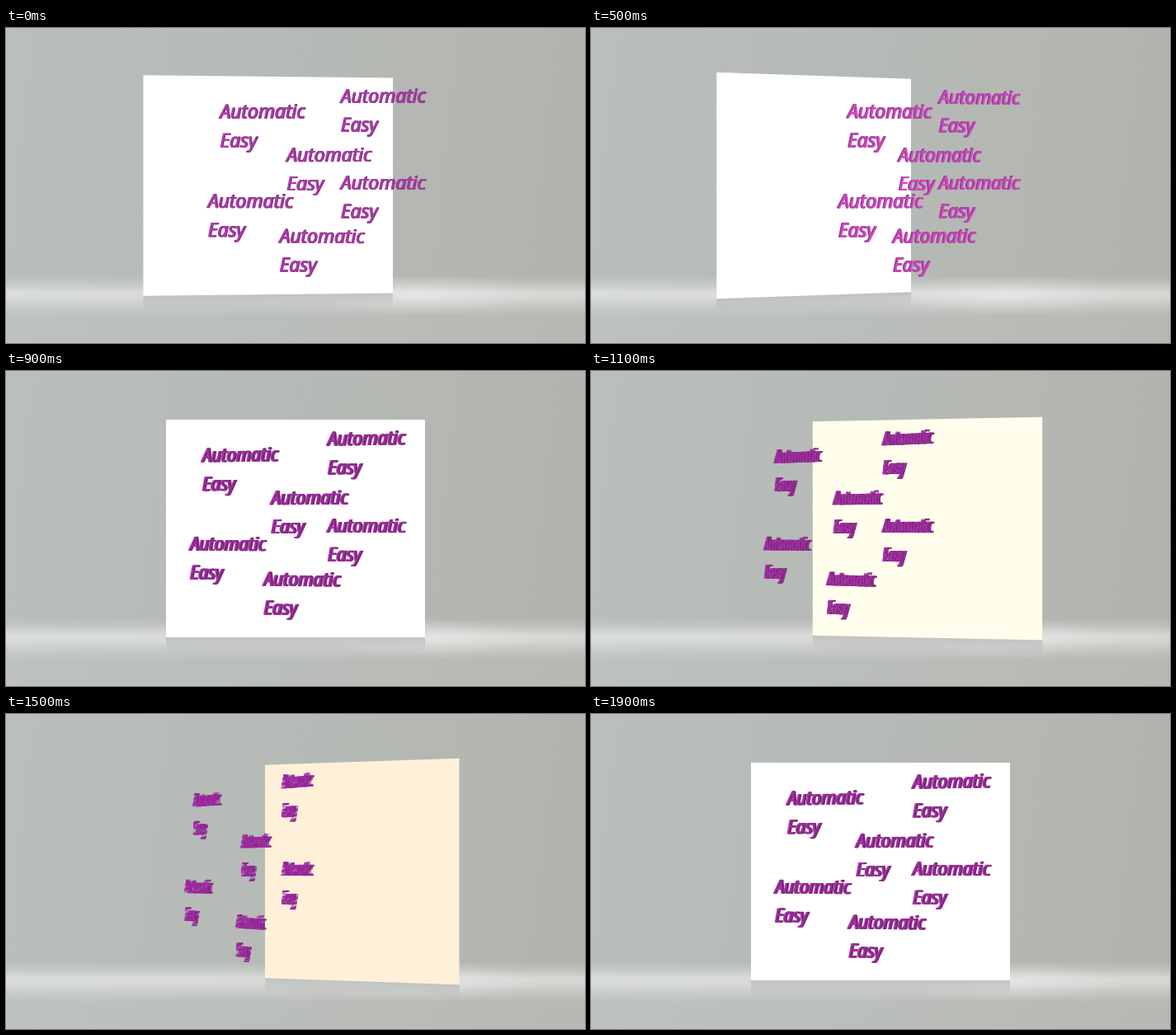
These frames come from a looping animation (702x382 px, 2000 ms). An HTML page:

```html
<!DOCTYPE html>
<html lang="en">
<head>
<meta charset="utf-8">
<title>Swinging card</title>
<style>
  html, body { margin: 0; width: 100%; height: 100%; overflow: hidden; }

  #stage {
    position: relative;
    width: 702px;
    height: 382px;
    overflow: hidden;
    perspective: 3600px;
    background:
      radial-gradient(ellipse 150px 24px at 500px 324px, #fff5, #fff0),
      linear-gradient(#fff0 300px, #fff3 311px, #fff7 320px, #fff7 326px, #fff4 336px, #fff1 350px, #fff1 382px),
      linear-gradient(97deg, #b9bfbb, #b6bab6 45%, #b1b3ad);
  }

  .swing {
    position: absolute;
    inset: 0;
    transform-style: preserve-3d;
    transform: translateZ(calc(-1 * var(--depth))) rotateY(var(--turn));
  }

  #back { --depth: -112px; }
  #front { --depth: 88px; }

  #card {
    position: absolute;
    left: 194px;
    top: 59px;
    width: 314px;
    height: 264px;
    background: var(--card);
    transform: translateZ(var(--depth));
  }

  #card::after {
    content: "";
    position: absolute;
    top: 100%;
    width: 100%;
    height: 19px;
    background: linear-gradient(#b9bbb8cc, #b9bbb800);
  }

  .words {
    position: absolute;
    display: grid;
    transform-style: preserve-3d;
    transform: translate(-50%) translateZ(var(--depth)) rotateY(-28deg);
    font: italic 400 23.5px/35px "Open Sans", "Noto Sans", sans-serif;
    white-space: pre;
  }

  .layer {
    grid-area: 1 / 1;
    color: var(--side);
    transform: translateZ(var(--z));
  }

  .layer:last-child { color: var(--face); }
</style>
</head>
<body>
<div id="stage">
  <div id="back" class="swing"><div id="card"></div></div>
  <div id="front" class="swing"></div>
</div>
<script>
  const STEP_MS = 100, STEPS = 20, MAX_TURN = 45, THICKNESS = 6;

  // Centre of each word pair's first line, facing the viewer
  const places = [[284, 104], [437, 84], [368, 156], [269, 212], [437, 190], [359, 255]];

  // Colours under the fixed light, by turn in degrees
  const shades = [
    { turn: -45, face: '#b02fb4', side: '#8b2390', card: '#ffeed7' },
    { turn: -29, face: '#ad30ae', side: '#842585', card: '#fffdec' },
    { turn: 0, face: '#ab2eab', side: '#792778', card: '#ffffff' },
    { turn: 16, face: '#b13cac', side: '#823083', card: '#ffffff' },
    { turn: 29, face: '#b83cb4', side: '#8f3592', card: '#ffffff' },
    { turn: 45, face: '#e04cc4', side: '#943a98', card: '#ffffff' }
  ];

  const stage = document.getElementById('stage');
  const front = document.getElementById('front');

  function addWords([x, y]) {
    const words = document.createElement('div');
    words.className = 'words';
    words.style.left = x + 'px';
    words.style.top = y - 19.6 + 'px';
    for (let i = 0; i <= THICKNESS; i++) {
      const layer = document.createElement('div');
      layer.className = 'layer';
      layer.textContent = 'Automatic\nEasy';
      layer.style.setProperty('--z', i - THICKNESS / 2 + 'px');
      if (i < THICKNESS) layer.setAttribute('aria-hidden', 'true');
      words.append(layer);
    }
    front.append(words);
  }

  const channels = hex => [1, 3, 5].map(i => parseInt(hex.slice(i, i + 2), 16));

  function mix(from, to, amount) {
    const end = channels(to);
    return `rgb(${channels(from).map((v, i) => Math.round(v + (end[i] - v) * amount))})`;
  }

  // Decelerates to each side and accelerates back through the middle
  function turnAt(step) {
    const phase = (step + 1) % STEPS;
    const half = STEPS / 2;
    const bend = 1 - (1 - (phase % half) / (half / 2)) ** 2;
    return MAX_TURN * bend * (phase < half ? 1 : -1);
  }

  function draw(step) {
    const turn = turnAt(step);
    const next = Math.max(1, shades.findIndex(s => s.turn >= turn));
    const a = shades[next - 1], b = shades[next];
    const amount = (turn - a.turn) / (b.turn - a.turn);
    stage.style.setProperty('--turn', turn + 'deg');
    for (const part of ['face', 'side', 'card']) {
      stage.style.setProperty('--' + part, mix(a[part], b[part], amount));
    }
  }

  function tick() {
    draw(Math.floor(performance.now() / STEP_MS) % STEPS);
    requestAnimationFrame(tick);
  }

  places.forEach(addWords);
  tick();
</script>
</body>
</html>
```
